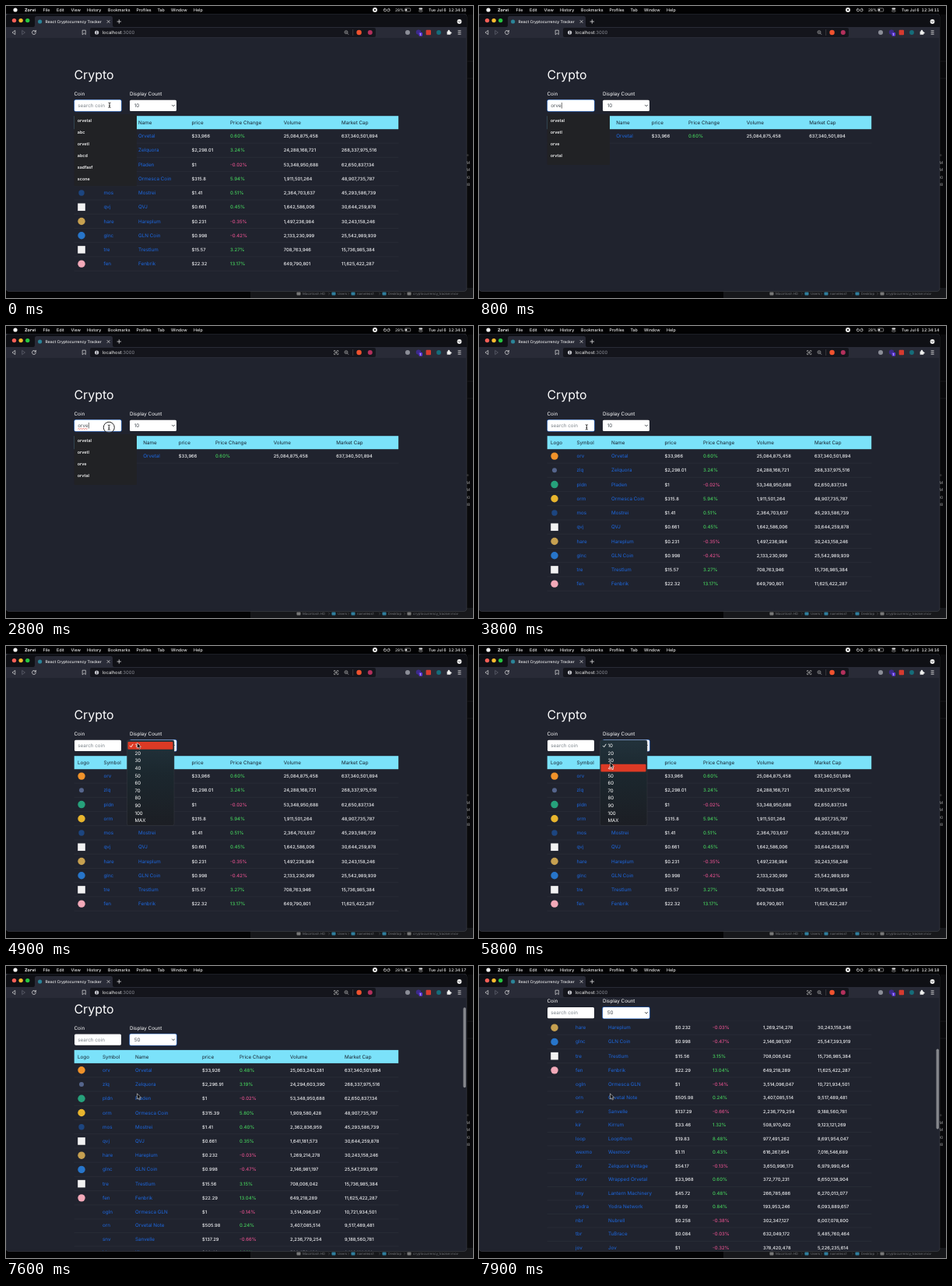
Animation, 600 px wide and 375 px high, one loop 8000 ms. Source, as an HTML page:

```html
<!DOCTYPE html>
<html lang="en">
<head>
<meta charset="utf-8">
<title>Crypto tracker</title>
<style>
html, body { margin: 0; width: 100%; height: 100%; overflow: hidden; background: #030304; }
svg { display: block; width: 100vw; height: 100vh; }
text { font-family: Inter, "Open Sans", sans-serif; text-rendering: geometricPrecision; white-space: pre; }
</style>
</head>
<body>
<svg id="stage" viewBox="0 0 600 375">
  <defs>
    <clipPath id="view"><path d="M0 41H592V362Q592 366 588 366H4Q0 366 0 362Z"/></clipPath>
    <linearGradient id="menuFill" x2="0" y2="1">
      <stop offset="0" stop-color="#22323b"/><stop offset=".4" stop-color="#1b272e"/><stop offset="1" stop-color="#1c1e24"/>
    </linearGradient>
  </defs>
  <rect width="600" height="375" fill="#030304"/>
  <g id="desk"></g>
  <path d="M0 10H588Q592 10 592 14V362Q592 366.5 588 366.5H4Q0 366.5 0 362Z" fill="#20232e" stroke="#41434a" stroke-width=".6"/>
  <g clip-path="url(#view)">
    <g id="page"></g>
    <rect id="cover" y="41" width="584" height="29" fill="#20232e"/>
    <g id="form"></g>
    <g id="bar"><rect x="587.5" width="3.4" height="103" rx="1.7" fill="#85878c"/></g>
  </g>
  <g id="chrome"></g>
  <g id="popup"></g>
  <g id="mouse">
    <circle id="ring" r="7" fill="#fff" fill-opacity=".25" stroke="#222" stroke-width="1"/>
    <path id="beam" d="M-1.5-3.2Q0-3.2 0-2Q0-3.2 1.5-3.2M0-2V2M-1.5 3.2Q0 3.2 0 2Q0 3.2 1.5 3.2M-.8 .7H.8" fill="none" stroke="#111" stroke-width=".8"/>
    <path id="arrow" d="M0-3.5V3.6L1.7 2.2L2.8 4.6L4 4L2.9 1.8H5Z" fill="#050505" stroke="#e8e8e8" stroke-width=".6"/>
  </g>
</svg>
<script>
const $ = id => document.getElementById(id);
const text = (x, y, s, size, fill = '#fff', more = '') =>
  `<text x="${x}" y="${y}" font-size="${size}" fill="${fill}" ${more}>${s}</text>`;
const rect = (x, y, w, h, fill, rx = 0, more = '') =>
  `<rect x="${x}" y="${y}" width="${w}" height="${h}" rx="${rx}" fill="${fill}" ${more}/>`;
const dot = (x, y, r, fill, more = '') => `<circle cx="${x}" cy="${y}" r="${r}" fill="${fill}" ${more}/>`;
const line = (d, stroke = '#ddd', w = .8) =>
  `<path d="${d}" fill="none" stroke="${stroke}" stroke-width="${w}" stroke-linecap="round"/>`;
const show = (id, on) => $(id).setAttribute('display', on ? 'inline' : 'none');
const BOLD = 'font-weight="600"';

// Desktop behind the window
const crumbs = [[381, 'Macintosh HD'], [426, 'Users'], [451, 'nameless1'], [491, 'Desktop'], [523, 'cryptocurrency_tracker.mov']];
$('desk').innerHTML =
  rect(314, 362, 286, 13, '#17181b') +
  crumbs.map(([x, s], i) =>
    rect(x - 7.5, 367.6, 5, 3.8, i == 0 || i == 4 ? '#777' : '#2f7d9c', .7) +
    text(x, 371.4, s, 4.4, '#73757a') +
    (i ? line(`M${x - 11.5} 368.2l1.3 1.3l-1.3 1.3`, '#666', .5) : '')).join('') +
  rect(593, 11, 7, 351, '#09090b') + line('M593 71H600M593 93H600', '#222', .6) +
  [['re', 192.5, '#555'], ['M', 202.5], ['M', 212], ['90', 221.5], ['38', 231]]
    .map(([s, y, c]) => text(s == 'M' ? 591.5 : 590, y, s, 5, c || '#aaa')).join('');

// Menu bar, tabs and toolbar
const menus = [[47.5, 'File'], [65, 'Edit'], [83.5, 'View'], [104, 'History'], [131, 'Bookmarks'],
  [167.5, 'Profiles'], [194.5, 'Tab'], [212, 'Window'], [241, 'Help']];
$('chrome').innerHTML =
  rect(0, 0, 600, 10, '#020203') + dot(12, 5, 2.6, '#f4f4f4') +
  text(24, 7, 'Zorvi', 5.4, '#fff', 'font-weight="700"') +
  menus.map(([x, s]) => text(x, 7, s, 5.3, '#eee', 'font-weight="500"')).join('') +
  dot(474, 5, 3, '#eee') + rect(473, 4, 2, 2, '#333', .3) +
  dot(487, 5.4, 1.6, 'none', 'stroke="#ddd" stroke-width=".7"') + dot(491.4, 5.4, 1.6, 'none', 'stroke="#ddd" stroke-width=".7"') +
  line('M485.4 5L486.4 3M493 5L492 3', '#ddd', .6) +
  text(500, 6.9, '28%', 5, '#eee') +
  rect(512.5, 3, 7.2, 4, 'none', 1, 'stroke="#bbb" stroke-width=".6"') + rect(513.2, 3.7, 2, 2.6, '#eee', .4) +
  rect(530.4, 2.4, 4.8, 2, '#ddd', 1) + rect(530.6, 5.5, 4.4, 1.8, 'none', .9, 'stroke="#ddd" stroke-width=".5"') +
  '<text id="clock" x="543" y="6.9" font-size="5.2" fill="#eee" font-weight="500" style="font-variant-numeric:tabular-nums"></text>' +
  '<path d="M0 27V14Q0 10.5 4 10.5H588Q592 10.5 592 14V27Z" fill="#0f1015"/>' +
  ['#ff5f57', '#febc2e', '#28c840'].map((c, i) => dot(10.5 + 8.6 * i, 18.6, 2.7, c)).join('') +
  '<path d="M35 27Q37 27 37 24V15.5Q37 13 39.5 13H134.5Q137 13 137 15.5V24Q137 27 139 27Z" fill="#292b37"/>' +
  dot(43.6, 20, 2.6, '#2b8498') + text(50.5, 21.9, 'React Cryptocurrency Tracker', 5, '#eee', 'font-weight="500"') +
  line('M130 18.4L133.2 21.6M133.2 18.4L130 21.6', '#ddd', .7) + line('M143 20H147.6M145.3 17.7V22.3') +
  dot(582.5, 20, 2.9, '#eee') + line('M581.3 19.6L582.5 20.8L583.7 19.6', '#222', .7) +
  rect(0, 27, 592, 14, '#292b37') + rect(108, 28, 367, 12, '#14151c', 2) +
  line('M11.4 31.6L8 34L11.4 36.4Z', '#ddd', .7) + line('M21 31.6L24.4 34L21 36.4Z', '#666974', .7) +
  line('M38 32.5A2.5 2.5 0 1 0 38.4 34.6M38.4 31.3V33.1H36.6', '#ddd', .8) +
  line('M98.5 31.2H102.3V36.6L100.4 35L98.5 36.6Z', '#ddd', .7) +
  dot(116.6, 34, 2.6, '#c9cad0') + line('M116.6 33.7V35.4M116.6 32.5V32.6', '#14151c', .7) +
  '<text x="123.5" y="36" font-size="5.9" fill="#eee">localhost<tspan fill="#8b8d96">:3000</tspan></text>' +
  '<g id="grid">' + line('M421.6 32.7V31.5H422.8M425.6 31.5H426.8V32.7M426.8 35.4V36.6H425.6M422.8 36.6H421.6V35.4M422.4 34H426M424.2 32.3V35.8', '#aaa', .8) + '</g>' +
  dot(437, 33.6, 2, 'none', 'stroke="#aaa" stroke-width=".7"') + line('M438.5 35.1L440 36.6M436.2 33.6H437.8', '#aaa', .7) +
  line('M445.7 30.5V37.5', '#555', .6) +
  dot(453.6, 34, 3.2, '#f0522e') + dot(467.8, 34, 3, '#b3305c') +
  dot(516, 34, 3, '#8b8e98') + dot(530, 33.6, 3.2, '#3b2a8c') + rect(530.5, 34, 4.5, 4.8, '#5b34d6', 1) + text(531.6, 38, '1', 4, '#fff', BOLD) +
  rect(539.6, 30.8, 6.4, 6.4, '#d63a2f', 1) + dot(556, 34, 2.9, '#156d7a') +
  rect(566.6, 32.4, 4.6, 4.4, '#eee', .6) + dot(568.9, 32, 1.2, '#eee') + dot(571.5, 34.5, 1.1, '#eee') +
  line('M581 31.8H584.2M581 34H584.2M581 36.2H584.2', '#eee', .8);

// symbol|name|price|change|volume|cap
const parse = s => s.trim().split('\n').map(r => r.trim().split('|'));
const early = parse(`
  orv|Orvetal|$33,966|0.60%|25,084,875,458|637,340,501,894
  zlq|Zelquora|$2,298.01|3.24%|24,288,168,721|268,337,975,516
  pldn|Pladen|$1|-0.02%|53,348,950,688|62,650,837,134
  orm|Ormesca Coin|$315.8|5.94%|1,911,501,264|48,907,735,787
  mos|Mostrei|$1.41|0.51%|2,364,703,637|45,293,586,739
  qvj|QVJ|$0.661|0.45%|1,642,586,006|30,644,259,878
  hare|Hareplum|$0.231|-0.35%|1,497,236,984|30,243,158,246
  glnc|GLN Coin|$0.998|-0.42%|2,133,230,999|25,542,989,939
  tre|Trestlum|$15.57|3.27%|708,763,946|15,736,985,384
  fen|Fenbrik|$22.32|13.17%|649,790,801|11,625,422,287`);
const late = parse(`
  orv|Orvetal|$33,926|0.48%|25,063,243,281|637,340,501,894
  zlq|Zelquora|$2,296.91|3.19%|24,294,603,390|268,337,975,516
  pldn|Pladen|$1|-0.02%|53,348,950,688|62,650,837,134
  orm|Ormesca Coin|$315.39|5.80%|1,909,580,428|48,907,735,787
  mos|Mostrei|$1.41|0.40%|2,362,836,959|45,293,586,739
  qvj|QVJ|$0.661|0.35%|1,641,181,573|30,644,259,878
  hare|Hareplum|$0.232|-0.03%|1,269,214,278|30,243,158,246
  glnc|GLN Coin|$0.998|-0.47%|2,146,981,197|25,547,393,919
  tre|Trestlum|$15.56|3.15%|708,006,042|15,736,985,384
  fen|Fenbrik|$22.29|13.04%|649,218,289|11,625,422,287
  ogln|Ormesca GLN|$1|-0.14%|3,514,096,047|10,721,934,501
  orn|Orvetal Note|$505.98|0.24%|3,407,085,514|9,517,489,481
  snv|Sanvelle|$137.29|-0.66%|2,236,779,254|9,188,560,781
  kir|Kirrum|$33.46|1.32%|508,970,402|9,123,121,269
  loop|Loopthorn|$19.83|8.48%|977,491,262|8,691,954,047
  wexmo|Wexmoor|$1.11|0.43%|616,267,854|7,016,546,689
  zlv|Zelquora Vintage|$54.17|-0.13%|3,650,996,173|6,979,990,454
  worv|Wrapped Orvetal|$33,968|0.60%|372,770,231|6,650,138,904
  lmy|Lantern Machinery|$45.72|0.48%|266,785,686|6,270,013,077
  yodra|Yodra Network|$6.09|0.84%|193,953,246|6,093,889,657
  nbr|Nubrell|$0.258|-0.38%|302,347,127|6,007,078,800
  tbr|TuBrace|$0.084|-0.03%|632,049,172|5,485,760,464
  jov|Jov|$1|-0.32%|378,420,478|5,226,235,614`);
const marks = { orv: '#f0922a', zlq: '#55658c', pldn: '#26a17b', orm: '#e8b52e', mos: '#1c4580',
  qvj: '#f2f2f2', hare: '#c6a050', glnc: '#2775ca', tre: '#f2f2f2', fen: '#f3a9b9' };
const heads = ['Logo', 'Symbol', 'Name', 'price', 'Price Change', 'Volume', 'Market Cap'];
const wide = [92, 125.5, 170, 238.5, 288, 356.7, 431];
const narrow = [92, 130, 176.3, 221.8, 269, 343.7, 424.2];
const long = [92, 124, 166, 252, 300, 365, 435];

const mark = (id, y) => {
  const c = marks[id];
  if (!c) return '';
  if (id == 'qvj' || id == 'tre') return rect(92.2, y - 4.8, 9.6, 9.6, c);
  return dot(97, y, { zlq: 3, mos: 3.7 }[id] || 4.7, c);
};
const table = (id, cols, rows) => {
  const body = rows.map((r, i) => {
    const y = i < 10 ? 167.1 + 18.23 * i : 349.2 + 17.5 * (i - 10);
    const tint = j => j < 2 ? '#1d68e0' : j == 3 ? (r[3][0] == '-' ? '#e0508c' : '#45cf5c') : '#f2f3f5';
    return line(`M88 ${y + 9}H504`, '#30343f', .5) + mark(r[0], y) +
      r.map((s, j) => text(cols[j + 1], y + 2.1, s, j < 2 ? 6.3 : j == 3 ? 6 : 5.8, tint(j), j > 1 ? 'font-weight="500"' : '')).join('');
  }).join('');
  return `<g id="${id}">` + rect(87.7, 141.2, 416.5, 17, '#7be2fa') +
    heads.map((s, j) => text(cols[j], 152, s, 6.3, '#17222f')).join('') + body + '</g>';
};
const tables = {
  full: [wide, early], pair: [wide, [early[0], early[3]]], one: [narrow, [early[0]]], fifty: [long, late]
};
$('page').innerHTML = text(87.5, 94, 'Crypto', 15.9, '#fff') +
  Object.entries(tables).map(([id, [cols, rows]]) => table(id, cols, rows)).join('');

const glow = (id, x) => `<g id="${id}">` +
  rect(x - .8, 120, 61.6, 15.8, '#1c4f9c', 2.2) +
  rect(x - .2, 120.6, 60.4, 14.6, '#86b7fe', 1.8) + '</g>';
$('form').innerHTML =
  text(87.5, 115.2, 'Coin', 6.3) + text(159, 115.2, 'Display Count', 6.3) +
  glow('inputGlow', 88) + rect(88, 120.8, 60, 14.2, '#fff', 1.6) +
  rect(92, 123.5, 14, 8.5, '#b4d5fe', 0, 'id="picked"') +
  text(92.3, 130, '', 6.3, '#495057', 'id="typed"') +
  `<g id="wave">${line('M92.5 132' + 'q.75-1.2 1.5 0t1.5 0'.repeat(4), '#e0352b', .6)}</g>` +
  rect(105.6, 124, .6, 7.6, '#222', 0, 'id="caret"') +
  glow('selectGlow', 159) + rect(159, 120.8, 60, 14.2, '#fff', 1.6) +
  text(164.8, 130, '', 6.3, '#495057', 'id="count"') +
  line('M213.5 127.2L215 128.8L216.5 127.2', '#343a40', .9);

const list = (id, items) => `<g id="${id}">` +
  rect(87.6, 139, 80.4, items.length * 15 + (items.length > 4 ? 2.2 : 5), '#212225', .8) +
  items.map((s, i) => text(91.8, 148.6 + 15 * i, s, 5.4, '#f4f4f4', BOLD)).join('') + '</g>';
const options = [10, 20, 30, 40, 50, 60, 70, 80, 90, 100, 'MAX'];
$('popup').innerHTML =
  list('recent', ['orvetal', 'abc', 'orvetl', 'abcd', 'sadfasf', 'scone']) +
  list('match', ['orvetal', 'orvetl', 'orve', 'orvtal']) +
  '<g id="options">' + rect(155.5, 121, 60.5, 109.5, 'url(#menuFill)', 2, 'stroke="#363b43" stroke-width=".5"') +
  rect(156.5, 0, 58, 9.8, '#dc3a25', 1, 'id="hover"') + line('M159.3 128.3L160.7 129.8L163 126.2', '#fff', .9) +
  options.map((s, i) => text(165.5, 130.2 + 9.6 * i, s, 6.1)).join('') + '</g>';

// Stepped values hold; tracks are interpolated between points
const step = (rows, t) => rows.filter(r => r[0] <= t).pop()[1];
const track = (rows, t) => {
  const i = rows.findIndex(r => r[0] > t);
  if (i < 0) return rows[rows.length - 1][1];
  if (i == 0) return rows[0][1];
  const [a, b] = [rows[i - 1], rows[i]], k = (t - a[0]) / (b[0] - a[0]);
  return a[1] + (b[1] - a[1]) * k;
};
const typing = [[0, ''], [200, 'o'], [400, 'or'], [500, 'orv'], [700, 'orve'], [3400, '']];
const mouseX = [[0, 133], [2600, 132.3], [3700, 132.3], [4300, 168.5]];
const mouseY = [[0, 127.3], [2600, 130.3], [3700, 130.3], [4300, 127.7], [5100, 127.7], [6200, 167.3]];
const scrolls = [[7500, 0], [7600, 33.3], [7700, 85], [7800, 142], [7900, 197.3]];
const clicks = [2800, 3000, 4500, 6300];
const OPEN = 4500, PICK = 6400, LOADED = 7500;

function draw(now) {
  const t = Math.floor((now % 8000) / 100) * 100;
  const word = step(typing, t), scroll = track(scrolls, t);
  const x = track(mouseX, t), y = track(mouseY, t);
  const open = t >= OPEN && t < PICK, focus = t < 4400;

  $('clock').textContent = `Tue Jul 6  12:34:${10 + Math.floor((t + 200) / 1000)}`;
  const current = t >= LOADED ? 'fifty' : word.length > 2 ? 'one' : word ? 'pair' : 'full';
  for (const id in tables) show(id, id == current);
  $('page').setAttribute('transform', `translate(0 ${-scroll})`);
  $('form').setAttribute('transform', `translate(0 ${-Math.min(scroll, 67.7)})`);
  show('cover', scroll > 67.7);
  show('bar', t >= LOADED);
  $('bar').setAttribute('transform', `translate(0 ${42.5 + scroll * .324})`);

  $('typed').textContent = word || 'search coin';
  $('typed').setAttribute('fill', word ? '#495057' : '#7b838a');
  const end = 92.6 + (word ? $('typed').getComputedTextLength() : 0);
  $('caret').setAttribute('x', end);
  show('caret', word && t < 3000 && (t + 300) % 1000 < 500);
  show('picked', t >= 3000 && t < 3400);
  $('picked').setAttribute('width', Math.max(0, end - 92.3));
  show('wave', word && t >= 2600);
  show('inputGlow', focus);
  show('selectGlow', t >= OPEN);
  $('count').textContent = t >= PICK ? 50 : 10;

  show('recent', t < 200);
  show('match', word);
  show('options', open);
  const over = Math.max(0, Math.min(10, Math.floor((y - 122.8) / 9.6)));
  $('hover').setAttribute('y', 123 + 9.6 * over);
  show('grid', t >= 1900);

  const inField = x < 149;
  show('mouse', t < 200 || t >= 2500);
  $('mouse').setAttribute('transform', `translate(${x} ${y})`);
  show('beam', inField);
  show('arrow', !inField);
  show('ring', clicks.some(c => t >= c && t < c + 100));
}

const start = performance.now();
function loop() {
  draw(performance.now() - start);
  requestAnimationFrame(loop);
}
loop();
</script>
</body>
</html>
```
